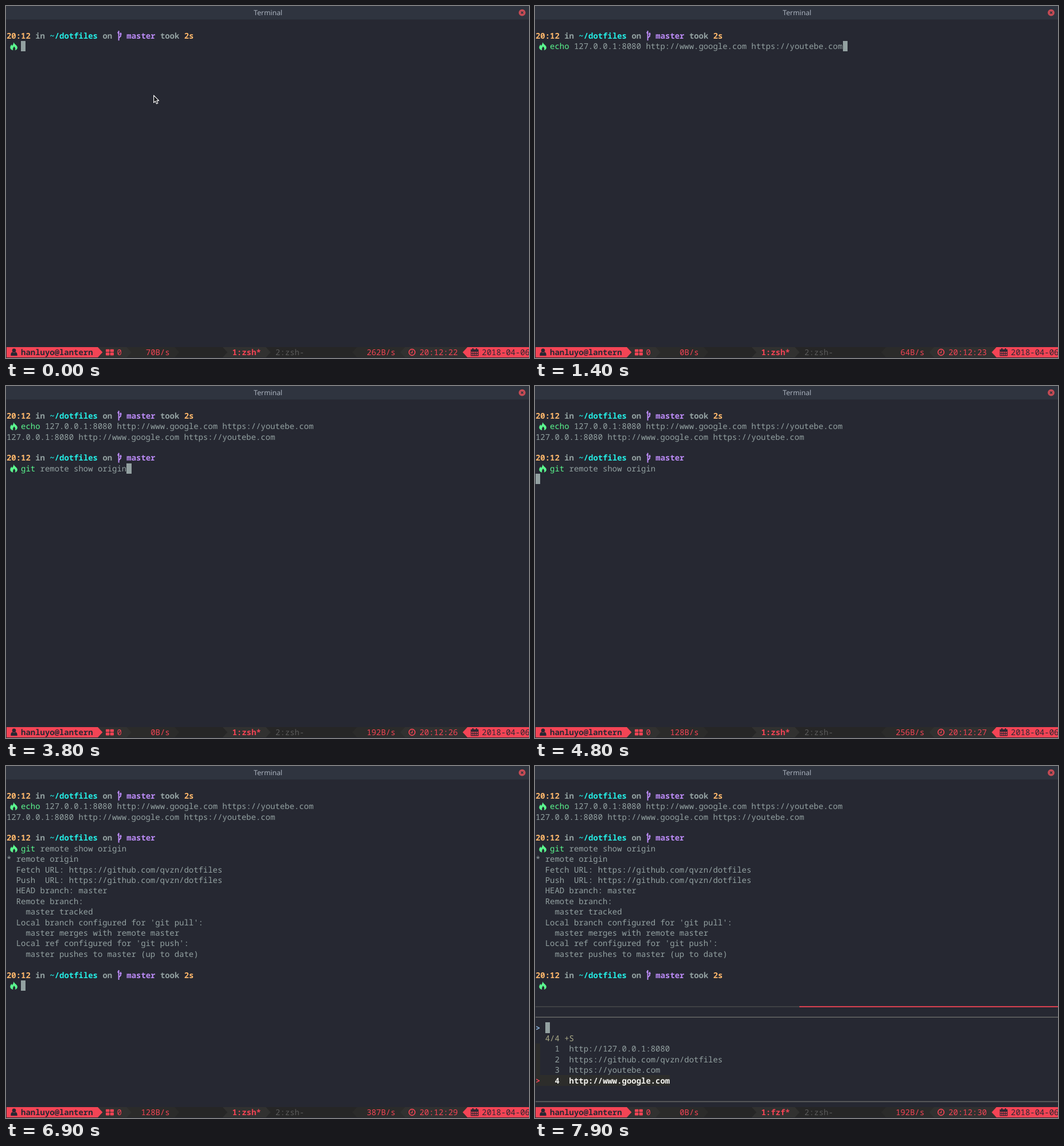
An HTML page that plays this animation: 912 px wide and 614 px high, repeating every 8 s.

```html
<!DOCTYPE html>
<html lang="en">
<head>
<meta charset="utf-8">
<title>Terminal</title>
<style>
  html, body { margin: 0; width: 100%; height: 100%; overflow: hidden; background: #262832; }
  svg { display: block; width: 912px; height: 614px; }
  text {
    font-family: "Noto Sans Mono", "DejaVu Sans Mono", monospace;
    font-size: 13.953px;
    white-space: pre;
    text-rendering: geometricPrecision;
  }
  .title { font: 12.2px "Noto Sans", "Open Sans", sans-serif; }
</style>
</head>
<body>
<svg id="stage" viewBox="0 0 912 614" xmlns="http://www.w3.org/2000/svg"></svg>
<script>
const LOOP = 8000;
const CELL = 8.372, ROW = 18.4, LEFT = 1, TOP = 24.2, ASCENT = 14.1;
const C = {
  bg: '#262832', fg: '#93a1a1', dim: '#555a66', red: '#f44455', green: '#5af78e',
  orange: '#ffb86c', cyan: '#24efe6', purple: '#bd8cf9', white: '#f2f2ee',
  blue: '#8fb8de', info: '#a9a987', border: '#646464', idle: '#454648',
  bar: '#262626', mid: '#2b2b2a', seg: '#313130', off: '#5a5a5a', gutter: '#2d2d2b'
};
const ECHO = 'echo 127.0.0.1:8080 http://www.google.com https://youtebe.com';
const GIT = 'git remote show origin';
const REPO = 'https://github.com/qvzn/dotfiles';
const REMOTE = [
  '* remote origin',
  '  Fetch URL: ' + REPO,
  '  Push  URL: ' + REPO,
  '  HEAD branch: master',
  '  Remote branch:',
  '    master tracked',
  "  Local branch configured for 'git pull':",
  '    master merges with remote master',
  "  Local ref configured for 'git push':",
  '    master pushes to master (up to date)'
];
const LINKS = ['http://127.0.0.1:8080', REPO, 'https://youtebe.com', 'http://www.google.com'];

// Each step changes part of the state; net is [down, up, seconds], cur is [column, row].
const STEPS = [
  [0, { pointer: true, cur: [3, 2], echo: 0, git: 0, prompts: 1, pick: 0, net: ['70B/s', '262B/s', 22] }],
  [400, { pointer: false }],
  [800, { echo: 1, cur: [4, 2], net: ['0B/s', '64B/s', 23] }],
  [900, { echo: 2, cur: [5, 2] }],
  [1000, { echo: 4, cur: [7, 2] }],
  [1400, { echo: ECHO.length, cur: [64, 2] }],
  [1800, { net: ['0B/s', '128B/s', 24] }],
  [2000, { echoed: true, cur: [0, 4] }],
  [2200, { prompts: 2, cur: [3, 6] }],
  [2800, { net: ['128B/s', '128B/s', 25] }],
  [3200, { git: 1, cur: [4, 6] }],
  [3300, { git: 3, cur: [6, 6] }],
  [3500, { git: 4, cur: [7, 6] }],
  [3800, { git: GIT.length, cur: [25, 6], net: ['0B/s', '192B/s', 26] }],
  [4500, { cur: [0, 7] }],
  [4800, { net: ['128B/s', '256B/s', 27] }],
  [5600, { remote: true, cur: [0, 17], net: ['241B/s', '2.1K/s', 28] }],
  [6000, { prompts: 3, cur: [3, 19] }],
  [6500, { net: ['128B/s', '387B/s', 29] }],
  [7000, { pick: 1, cur: [2, 23] }],
  [7500, { pick: 2, net: ['0B/s', '192B/s', 30] }],
  [7700, { pick: 3 }],
  [7900, { pick: 4 }]
];

const colX = c => LEFT + c * CELL;
const rowY = r => TOP + r * ROW;
const esc = s => s.replace(/&/g, '&amp;').replace(/</g, '&lt;');
const text = (c, r, s, fill = C.fg, bold = false) =>
  `<text x="${colX(c).toFixed(2)}" y="${(rowY(r) + ASCENT).toFixed(2)}" fill="${fill}"` +
  `${bold ? ' font-weight="700"' : ''}>${esc(s)}</text>`;
const rect = (x, y, w, h, fill, extra = '') =>
  `<rect x="${x}" y="${y}" width="${w}" height="${h}" fill="${fill}" ${extra}/>`;
const path = (d, fill, extra = '') => `<path d="${d}" fill="${fill}" ${extra}/>`;
const at = (x, y, inner) => `<g transform="translate(${x} ${y})">${inner}</g>`;

// Cell backgrounds snap to whole pixels.
function cells(c, r, n, fill) {
  const x = Math.round(colX(c)), y = Math.round(rowY(r));
  return rect(x, y, Math.round(colX(c + n)) - x, Math.round(rowY(r + 1)) - y, fill);
}

const flame = r => at(7, rowY(r) + 2, path(
  'M6.2 0C7 3.2 11 4.6 12.6 8C13.8 11.2 11.2 14 8.6 14.2C10 12 9.4 10 7 7.4' +
  'C6.4 9.2 4.2 10.8 5.4 14.2C2.2 13.8-.2 11.4.4 8.2C.8 6.4 2 5.4 2.4 4' +
  'C3 4.8 3.4 5.6 3.6 6.4C5.4 4.6 6.2 2.6 6.2 0Z', C.green));

const branch = r => at(194, rowY(r) + .6, path('M2.6 0V17M2.8 12.4L6 9.4V5.4', 'none',
  `stroke="${C.purple}" stroke-width="1.9"`) + path('M0 3.6L2.6 0V6ZM3.8 6.4L6 2.6L8.2 6.4Z', C.purple));

function prompt(r, took) {
  return text(0, r, '20:12', C.orange, true) + text(6, r, 'in', C.fg, true) +
    text(9, r, '~/dotfiles', C.cyan, true) + text(20, r, 'on', C.fg, true) + branch(r) +
    text(25, r, 'master', C.purple, true) +
    (took ? text(32, r, 'took', C.fg, true) + text(37, r, '2s', C.orange, true) : '') +
    flame(r + 1);
}

// Typed part of a command, followed by the dim suggestion from history.
function command(r, line, typed) {
  if (!typed) return '';
  const space = line.indexOf(' ');
  const head = Math.min(typed, space);
  return text(3, r, line.slice(0, head), typed < space ? C.red : C.green) +
    text(3 + head, r, line.slice(head, typed)) +
    text(3 + typed, r, line.slice(typed, typed + 1), C.bg) +
    text(4 + typed, r, line.slice(typed + 1), C.dim);
}

function picker(pick) {
  const rule = (r, x1, x2, color, h) => rect(x1, rowY(r) + ROW / 2 - h / 2, x2 - x1, h, color);
  let out = rule(21, 1, 461, C.idle, 1.6) + rule(21, 461, 912, C.red, 1.8) +
    rule(22, 1, 912, C.border, 1.6) + rule(30, 1, 912, C.border, 1.6) +
    text(0, 23, '>', C.blue, true) + text(2, 24, '4/4 +S', C.info);
  LINKS.forEach((link, i) => {
    const r = 25 + i, on = pick === i + 1, color = on ? C.white : C.fg;
    out += cells(0, r, on ? 7 + link.length : 1, C.gutter) +
      (on ? text(0, r, '>', C.red, true) : '') +
      text(4, r, String(i + 1), color, on) + text(7, r, link, color, on);
  });
  return out;
}

// Status segment from column a to b with a pointed end on the right or left.
function segment(a, b, fill, leftward) {
  const y = Math.round(rowY(31)), end = Math.round(rowY(32));
  const [base, tip, far] = leftward ? [a + 1, a, b] : [b - 1, b, a];
  return path(`M${colX(far)} ${y}H${colX(base)}L${colX(tip)} ${(y + end) / 2}L${colX(base)} ${end}H${colX(far)}Z`, fill);
}

function icons() {
  const user = at(8, 597, `<circle cx="6" cy="3.9" r="3.3" fill="${C.bg}"/>` +
    path('M.4 13V10.6C.4 8 2 7 3.4 6.8Q6 8.8 8.6 6.8C10 7 11.6 8 11.6 10.6V13Z', C.bg));
  const grid = [0, 1, 2, 3].map(i =>
    rect(174 + (i & 1) * 7.6, 598.8 + (i >> 1) * 5.8, 6.4, 4.8, C.red, 'rx=".8"')).join('');
  const clock = at(708, 604, `<circle r="5.3" fill="none" stroke="${C.red}" stroke-width="1.7"/>` +
    path('M.5-3.2V.8H-2.6', 'none', `stroke="${C.red}" stroke-width="1.2"`));
  const calendar = at(810.5, 597, path('M.6 2.6H12.9V12.9H.6ZM.6 5.4H12.9M.6 9.1H12.9M3.7 5V13M6.8 5V13M9.8 5V13',
    'none', `stroke="${C.bg}" stroke-width="1.1"`) + rect(.3, 2, 12.9, 2.8, C.bg) +
    rect(2.6, 0, 2.2, 4, C.bg) + rect(8.8, 0, 2.2, 4, C.bg));
  return user + grid + clock + calendar;
}

function status({ net: [down, up, sec], pick }) {
  return cells(0, 31, 109, C.bar) +
    segment(0, 36, C.mid) + segment(0, 26, C.seg) + segment(0, 20, C.red) +
    segment(45, 55, C.seg) + segment(44, 46, C.bar) +
    segment(72, 109, C.mid, true) + segment(82, 109, C.seg, true) + segment(95, 109, C.red, true) +
    icons() +
    text(3, 31, 'hanluyo@lantern', C.bg, true) + text(23, 31, '0', C.red) +
    text(34 - down.length, 31, down, C.red) +
    text(47, 31, pick ? '1:fzf*' : '1:zsh*', C.red, true) + text(56, 31, '2:zsh-', C.off) +
    text(81 - up.length, 31, up, C.red) + text(86, 31, '20:12:' + sec, C.red) +
    text(99, 31, '2018-04-06', C.bg);
}

const titleBar = rect(0, 0, 912, 23.5, '#2f343f') +
  '<text class="title" x="457" y="16" text-anchor="middle" fill="#a9b1bd">Terminal</text>' +
  '<circle cx="900" cy="11.6" r="5.9" fill="#c74b55"/>' +
  path('M898.1 9.7L901.9 13.5M901.9 9.7L898.1 13.5', 'none', 'stroke="#2f343f" stroke-width="1.4"');

const pointer = path('M257.6 155.8V168.6L260.5 165.9L262.5 170.6L264.8 169.6L262.8 165.1H266.6Z',
  '#15161a', 'stroke="#fff" stroke-width="1.1" stroke-linejoin="round"');

function draw(s) {
  const [c, r] = s.cur;
  return rect(0, 0, 912, 614, C.bg) + titleBar +
    cells(c, r, 1, C.fg) +
    prompt(1, true) + command(2, ECHO, s.echo) +
    (s.echoed ? text(0, 3, ECHO.slice(5)) : '') +
    (s.prompts > 1 ? prompt(5, false) + command(6, GIT, s.git) : '') +
    (s.remote ? REMOTE.map((line, i) => text(0, 7 + i, line)).join('') : '') +
    (s.prompts > 2 ? prompt(18, true) : '') +
    (s.pick ? picker(s.pick) : '') +
    status(s) + (s.pointer ? pointer : '');
}

const stage = document.getElementById('stage');
const start = performance.now();
let shown = -1;

function tick() {
  const t = (performance.now() - start) % LOOP;
  const count = STEPS.filter(([time]) => time <= t).length;
  if (count !== shown) {
    shown = count;
    stage.innerHTML = draw(Object.assign({}, ...STEPS.slice(0, count).map(([, change]) => change)));
  }
  requestAnimationFrame(tick);
}
tick();
</script>
</body>
</html>
```
